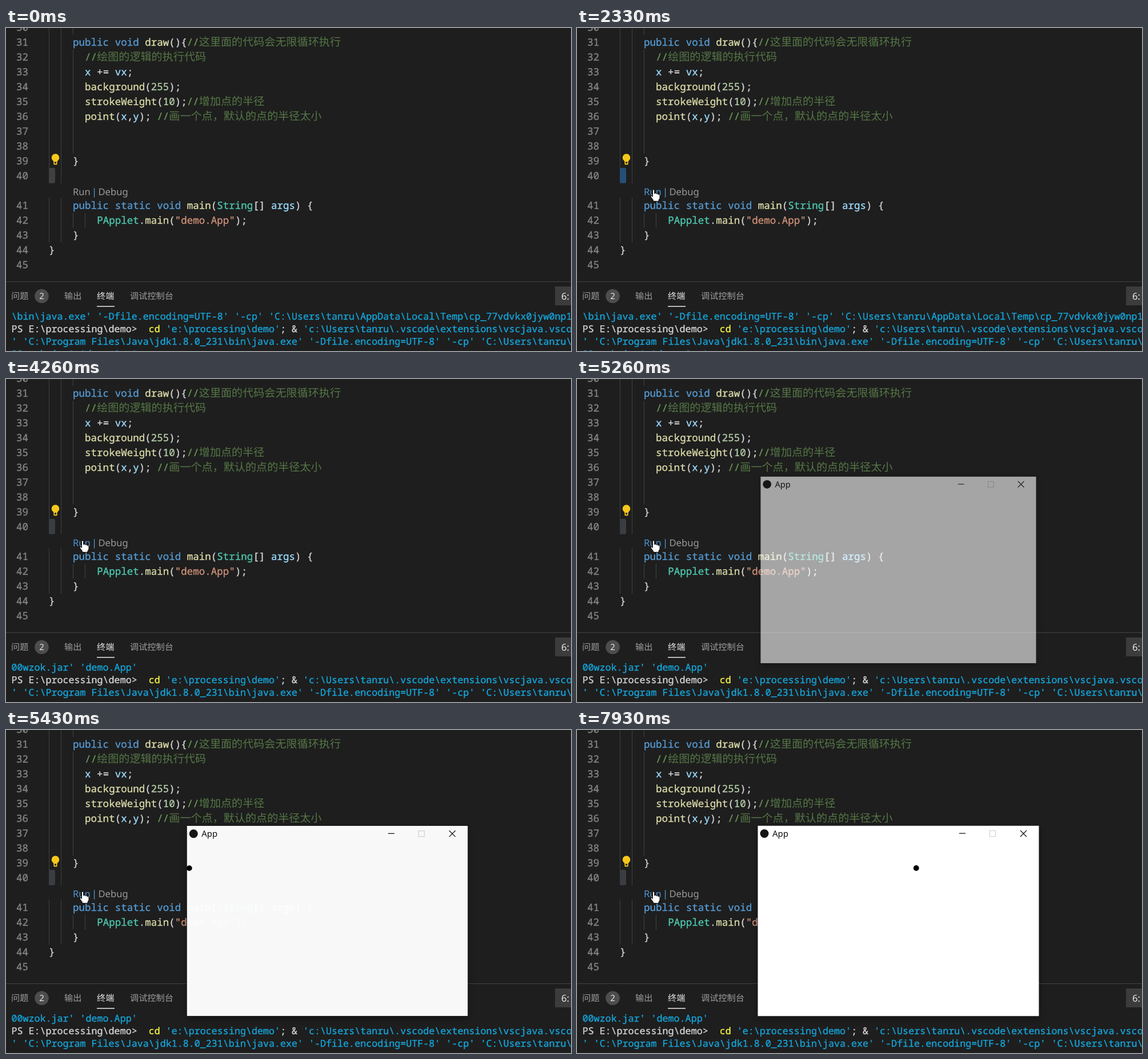
Write an HTML page that moves like this. It is 989 by 566 pixels and loops after 8 s.

```html
<!DOCTYPE html>
<html lang="zh">
<head>
<meta charset="utf-8">
<title>Editor run</title>
<style>
html, body { margin: 0; width: 100%; height: 100%; overflow: hidden; background: #1e1e1e; }
svg { display: block; width: 100vw; height: 100vh; }
text { white-space: pre; text-rendering: geometricPrecision; stroke-width: 0; }
.code { font: 17.53px "Noto Sans Mono", monospace; stroke-width: .35px; }
.term { font: 16.69px "Noto Sans Mono", monospace; stroke-width: .35px; }
.cjk { font: 300 19.1px "Noto Sans CJK SC", "Noto Sans CJK", sans-serif; stroke-width: 0; opacity: .85; fill-opacity: .85; }
.tab { font: 15.2px "Noto Sans CJK SC", "Noto Sans CJK", sans-serif; }
.lens { font: 16.6px "Noto Sans", sans-serif; }
.ui { font: 15px "Noto Sans", sans-serif; }
</style>
</head>
<body>
<svg viewBox="0 0 989 566">
  <rect width="989" height="566" fill="#1e1e1e"/>
  <path d="M75.5 0V272M96.5 0V272M117.5 0V12M117.5 38V220M75.5 297V376M96.5 297V376M117.5 324V350M138.5 324V350" stroke="#404040"/>
  <rect id="selection" x="75" y="245" width="11" height="27" rx="3"/>
  <rect id="caret" x="75" y="245" width="2.5" height="27" fill="#aeafad"/>
  <g id="bulb" fill="#f6c81c">
    <path d="M86.5 220.5a6.7 6.7 0 0 1 4.2 11.9c-.8.7-1.1 1.6-1.1 2.6v3.6a1 1 0 0 1-1 1h-4.2a1 1 0 0 1-1-1V235c0-1-.3-1.9-1.1-2.6a6.7 6.7 0 0 1 4.2-11.9z"/>
    <path d="M85 234.5h3v3h-3z" fill="#1e1e1e"/>
  </g>
  <g id="editor"></g>
  <path d="M0 444.5H989" stroke="#434343"/>
  <g id="panel">
    <circle cx="62.5" cy="469.8" r="12.3" fill="#4d4d4d"/>
    <rect x="159" y="487" width="31" height="1.5" fill="#e7e7e7"/>
    <rect x="961" y="453" width="28" height="33" fill="#3c3c3c"/>
  </g>
  <g id="before"></g>
  <g id="after"></g>
  <circle id="click" cx="134" cy="282.5" r="13.5" fill="#ff0" fill-opacity=".47"/>
  <g id="pointer">
    <path id="beam" d="M-3-7.5H-1L0-6.5 1-7.5H3M0-6.5V6.5M-3 7.5H-1L0 6.5 1 7.5H3" fill="none" stroke="#ddd" stroke-width="1.2"/>
    <path id="hand" d="M-1.5 1Q0-1 1.5 1V7Q3.5 5.5 4.8 7.5 6.8 6.3 8 8.5 10.5 7.5 11 10V15L9 18.5V20.5H-.5V18.5L-4.3 13.5Q-5.5 10.5-3.2 11L-1.5 12.8Z" fill="#fff" stroke="#111"/>
  </g>
  <g id="app">
    <rect x="316.5" y="167.8" width="492" height="333.5" fill="#fff" style="filter:drop-shadow(0 4px 6px rgba(0,0,0,.4))"/>
    <circle cx="328" cy="181.5" r="7.5" fill="#141414"/>
    <path d="M669 181.2H680M776 176L787 187M787 176L776 187" stroke="#111" stroke-width="1.2"/>
    <rect x="722.5" y="176.5" width="10" height="10" fill="none" stroke="#ccc"/>
    <circle id="dot" cy="242" r="4.9"/>
  </g>
</svg>
<script>
const $ = id => document.getElementById(id);
const NS = "http://www.w3.org/2000/svg";
const colors = {
  plain: "#d4d4d4", keyword: "#569cd6", call: "#dcdcaa", name: "#9cdcfe", type: "#4ec9b0",
  string: "#ce9178", number: "#b5cea8", comment: "#6a9955", gutter: "#858585",
  lens: "#999999", tab: "#9d9d9d", bright: "#e7e7e7", cyan: "#14a6dc", yellow: "#f5f543", black: "#111"
};

// parts alternate color name and string; non-ASCII code runs use the CJK face
function write(parent, style, x, y, ...parts) {
  const line = document.createElementNS(NS, "text");
  line.setAttribute("class", style);
  line.setAttribute("x", x);
  line.setAttribute("y", y);
  for (let i = 0; i < parts.length; i += 2) {
    const span = document.createElementNS(NS, "tspan");
    span.setAttribute("fill", colors[parts[i]]);
    span.setAttribute("stroke", colors[parts[i]]);
    if (style === "code" && parts[i + 1].charCodeAt(0) > 255) span.setAttribute("class", "cjk");
    span.textContent = parts[i + 1];
    line.append(span);
  }
  $(parent).append(line);
  return line;
}

const CELL = 10.518, LEFT = 75;
const baseline = n => n < 41 ? 31 + (n - 31) * 25.95 : 316.5 + (n - 41) * 26;
const code = (n, col, ...parts) => write("editor", "code", LEFT + col * CELL, baseline(n), ...parts);

for (let n = 30; n <= 45; n++) write("editor", "code", 18, baseline(n), "gutter", String(n));
code(31, 4, "keyword", "public void ", "call", "draw", "plain", "(){", "comment", "//", "comment", "这里面的代码会无限循环执行");
code(32, 6, "comment", "//", "comment", "绘图的逻辑的执行代码");
code(33, 6, "name", "x", "plain", " += ", "name", "vx", "plain", ";");
code(34, 6, "call", "background", "plain", "(", "number", "255", "plain", ");");
code(35, 6, "call", "strokeWeight", "plain", "(", "number", "10", "plain", ");", "comment", "//", "comment", "增加点的半径");
code(36, 6, "call", "point", "plain", "(", "name", "x", "plain", ",", "name", "y", "plain", "); ", "comment", "//", "comment", "画一个点，默认的点的半径太小");
code(39, 4, "plain", "}");
code(41, 4, "keyword", "public static void ", "call", "main", "plain", "(", "type", "String", "plain", "[] ", "name", "args", "plain", ") {");
code(42, 8, "type", "PApplet", "plain", ".", "call", "main", "plain", "(", "string", '"demo.App"', "plain", ");");
code(43, 4, "plain", "}");
code(44, 0, "plain", "}");
const run = write("editor", "lens", 117, 293, "lens", "Run").firstChild;
write("editor", "lens", 150, 293, "keyword", "|");
write("editor", "lens", 161.5, 293, "lens", "Debug");

write("panel", "tab", 9, 475, "tab", "问题");
write("panel", "ui", 58.3, 475.3, "bright", "2");
write("panel", "tab", 102, 475, "tab", "输出");
write("panel", "tab", 159, 475, "bright", "终端");
write("panel", "tab", 217, 475, "tab", "调试控制台");
write("panel", "lens", 972, 476, "bright", "6:");

const raw = String.raw;
const jarLine = ["cyan", "00wzok.jar' 'demo.App'"];
const cdLine = ["plain", raw`PS E:\processing\demo>  `, "yellow", "cd ", "cyan", raw`'e:\processing\demo'`,
  "plain", "; & ", "cyan", raw`'c:\Users\tanru\.vscode\extensions\vscjava.vscode`];
const javaLine = ["cyan", raw`' 'C:\Program Files\Java\jdk1.8.0_231\bin\java.exe' '-Dfile.encoding=UTF-8' '-cp' 'C:\Users\tanru\App`];
const oldLine = ["cyan", raw`\bin\java.exe' '-Dfile.encoding=UTF-8' '-cp' 'C:\Users\tanru\AppData\Local\Temp\cp_77vdvkx0jyw0np1`];
const terminal = (id, lines) => lines.map((parts, i) => write(id, "term", 9.4, 511 + 22 * i, ...parts));
terminal("before", [oldLine, cdLine, javaLine, jarLine]);
const lastLine = terminal("after", [jarLine, cdLine, javaLine])[2];
write("app", "ui", 342, 187, "black", "App");

const show = (node, on) => node.setAttribute("visibility", on ? "inherit" : "hidden");

// time, x, y of the mouse hot spot
const mousePath = [
  [70, 812, 558], [145, 600, 495], [220, 395, 430], [450, 300, 410], [540, 200, 393], [630, 120, 381],
  [770, 124, 350], [850, 128, 310], [920, 130, 280], [1000, 132, 258], [1080, 133, 268], [1150, 134, 278],
  [1320, 134, 281], [1390, 134, 283]
];

const dotPath = [[2, 320.5], [10, 390], [21, 486.3], [32, 578], [34, 593.8]];
function dotX(step) {
  let i = 1;
  while (i < dotPath.length - 1 && step > dotPath[i][0]) i++;
  const [s0, x0] = dotPath[i - 1], [s1, x1] = dotPath[i];
  return x0 + (x1 - x0) * (step - s0) / (s1 - s0);
}

function drawMouse(t) {
  const spot = mousePath.filter(p => p[0] <= t).pop();
  show($("pointer"), spot);
  const onRun = !!spot && spot[2] > 275 && spot[2] < 300;
  if (spot) $("pointer").setAttribute("transform", `translate(${spot[1]} ${spot[2]})`);
  show($("hand"), onRun);
  show($("beam"), spot && !onRun);
  run.setAttribute("fill", onRun ? "#4e94ce" : colors.lens);
  show($("click"), t >= 1550 && t < 1820);
}

function drawApp(t) {
  show($("app"), t >= 5260);
  if (t < 5260) return;
  const step = Math.floor((t - 5260) / 78);
  const fade = step < 3 ? Math.exp(-step * 78 / 58) : 0;
  const scale = 1 - 0.02 * fade;
  $("app").setAttribute("opacity", 1 - 0.4 * fade);
  $("app").setAttribute("transform", `translate(562.5 334.5) scale(${scale}) translate(-562.5 -334.5)`);
  show($("dot"), step >= 2);
  $("dot").setAttribute("cx", dotX(step));
}

function draw(t) {
  const focused = t >= 2010 && t < 3940;
  $("selection").setAttribute("fill", focused ? "#264f78" : t < 2010 ? "#404040" : "#3a3d41");
  show($("caret"), focused && (t < 2330 || t >= 2860 && t < 3320 || t >= 3790));
  show($("before"), t < 4170);
  show($("after"), t >= 4170);
  show(lastLine, t >= 4260);
  drawMouse(t);
  drawApp(t);
}

const start = performance.now();
function tick() {
  draw((performance.now() - start) % 8000);
  requestAnimationFrame(tick);
}
tick();
</script>
</body>
</html>
```
